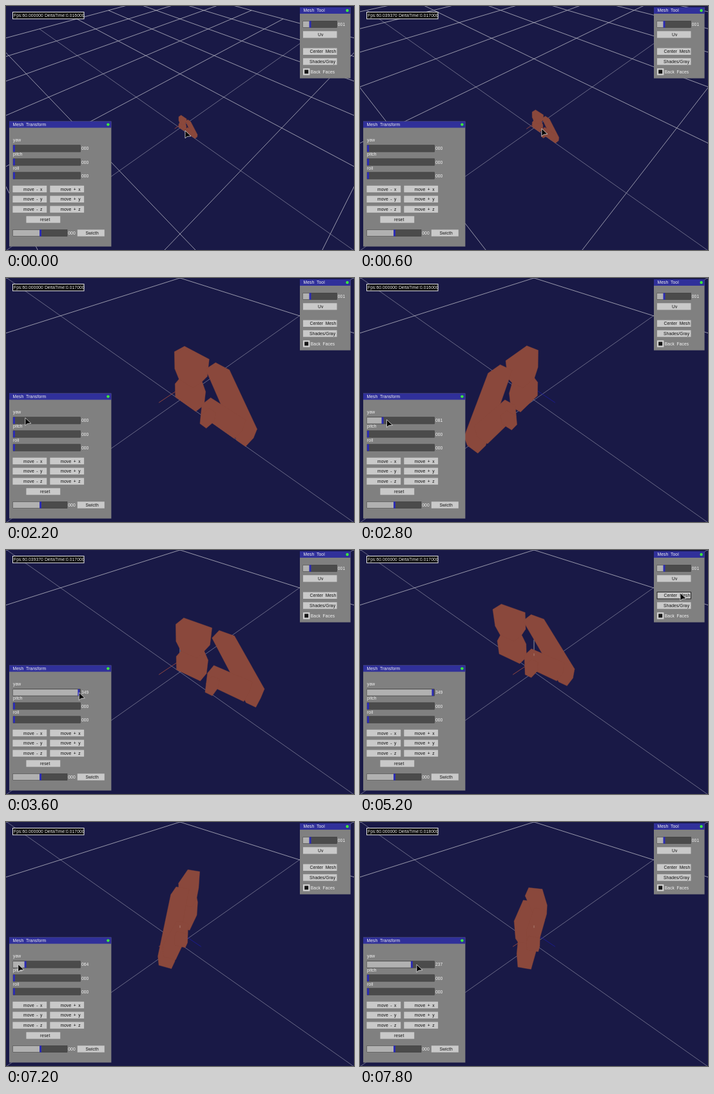
Recreate the animation shown at these times as an HTML page. Size 540 px wide and 380 px high, loop 8 s.

```html
<!DOCTYPE html>
<html lang="en">
<head>
<meta charset="utf-8">
<title>Mesh viewer</title>
<style>
html, body { margin: 0; width: 100%; height: 100%; overflow: hidden; background: #191946; }
svg { display: block; width: 540px; height: 380px; }
text { font: 6.7px "Liberation Sans", Arial, sans-serif; letter-spacing: .1px; white-space: pre; }
</style>
</head>
<body>
<svg id="stage" viewBox="0 0 540 380" xmlns="http://www.w3.org/2000/svg"></svg>
<script>
const LOOP = 8000, STEP = 200;
const CX = 270, CY = 190, FOCAL = 345, C = Math.SQRT1_2, NEAR = 0.02;
const CELL = 1.226, CELLS = 5;      // floor grid
const PIVOT = 0.044, BASE = 0.03;   // depth and height of the mesh origin
const LAG = 60;                     // the slider trails the pointer
const svg = document.getElementById('stage');

function add(tag, attrs) {
  const el = document.createElementNS(svg.namespaceURI, tag);
  set(el, attrs);
  return svg.appendChild(el);
}
function set(el, attrs) { for (const k in attrs) el.setAttribute(k, attrs[k]); }
const rect = (x, y, width, height, fill, more) => add('rect', { x, y, width, height, fill, ...more });
function label(x, y, str, fill = '#f2f2f2', more) {
  const el = add('text', { x, y, fill, ...more });
  el.textContent = str;
  return el;
}

// Stops of the pointer: time, x, y
const STOPS = [
  [0, 278, 194], [1400, 288, 186], [2350, 11.3, 220], [3600, 113.3, 222],
  [4600, 514, 76], [4800, 497, 67], [5200, 497, 67], [5600, 114, 221],
  [6200, 1, 221], [6540, 114.8, 219], [6620, 114.8, 219], [7400, 0, 222], [7820, 88.5, 222]
];
function pointer(t) {
  const i = Math.max(1, STOPS.findIndex(s => s[0] >= t));
  const last = t > STOPS[STOPS.length - 1][0] ? STOPS.length - 1 : i;
  const [t0, x0, y0] = STOPS[last - 1], [t1, x1, y1] = STOPS[last];
  const p = Math.min(1, Math.max(0, (t - t0) / (t1 - t0)));
  const k = p * p * (3 - 2 * p);
  return [x0 + (x1 - x0) * k, y0 + (y1 - y0) * k];
}

// Yaw follows the pointer while the slider is held, and rests in between
function yawAt(t) {
  if (t < 2400) return 0;
  const held = t > 5600 ? t : Math.min(t, 3600);
  const v = (pointer(held - LAG)[0] - 11.3) / 104.6 * 360;
  return Math.round(Math.min(360, Math.max(0, v)));
}

// Figure as convex outlines [along, height], extruded by THICK
const THICK = 0.055, TOP = 0.241, WAIST = TOP / 2;
const box = (a, b, low, high) => [[a, low], [b, low], [b, high], [a, high]];
const lobe = [...box(-.024, .101, 0, .08), [.078, WAIST], [0, WAIST]];
const PARTS = [
  lobe,
  lobe.map(([a, h]) => [a, TOP - h]),
  [[.1305, TOP], [.191, TOP], [.35, .056], [.35, 0], [.31, 0], [.28, .065]],
  box(.13, .3, 0, .065),
  box(.13, .166, -.057, 0)
];

// u: right, v: away, h: up; the camera looks down at 45 degrees
const toCam = (u, v, h, dist) => [u, (v + h) * C, dist + (v - h) * C];
const toScreen = ([x, y, z]) => [CX + FOCAL * x / z, CY - FOCAL * y / z];

function placeLine(el, p, q) {
  if (p[2] < NEAR && q[2] < NEAR) return set(el, { visibility: 'hidden' });
  const clip = (a, b) => {
    if (a[2] >= NEAR) return a;
    const k = (NEAR - a[2]) / (b[2] - a[2]);
    return a.map((v, i) => v + (b[i] - v) * k);
  };
  const [x1, y1] = toScreen(clip(p, q)), [x2, y2] = toScreen(clip(q, p));
  set(el, { x1, y1, x2, y2, visibility: 'visible' });
}

function hull(points) {
  const pts = points.slice().sort((a, b) => a[0] - b[0] || a[1] - b[1]);
  const half = list => {
    const out = [];
    for (const p of list) {
      while (out.length > 1) {
        const [a, b] = out.slice(-2);
        if ((b[0] - a[0]) * (p[1] - a[1]) - (b[1] - a[1]) * (p[0] - a[0]) > 0) break;
        out.pop();
      }
      out.push(p);
    }
    return out.slice(0, -1);
  };
  return half(pts).concat(half(pts.reverse()));
}

// Scene
rect(0, 0, 540, 380, '#191946');
const grid = [];
for (let n = -CELLS; n <= CELLS; n++) for (const side of [-1, 1]) {
  grid.push({ n, side, el: add('line', { stroke: n ? '#b9b9c6' : '#8c8ca2', 'stroke-width': n ? .8 : .7 }) });
}
const axis = (color, dir) => ({ dir, el: add('line', { stroke: color, 'stroke-width': .9 }) });
const axes = [
  axis('#9c4a40', [-.09, -.09, 0]),
  axis('#1a1a96', [.09, -.09, 0]),
  axis('#a9a3a4', [0, 0, .117])
];
const solids = PARTS.map(() => add('polygon', { fill: '#8a483c', stroke: '#8a483c', 'stroke-width': .4 }));
const tick = add('line', { stroke: '#b58d84', 'stroke-width': .8 });

// Interface
function panel(x, y, w, h, title) {
  rect(x, y, w, h, '#808080');
  rect(x, y, w, 10, '#30309a');
  label(x + 5.5, y + 7.2, title, '#f2f2f2', { 'word-spacing': 2 });
  add('circle', { cx: x + w - 5, cy: y + 5, r: 2.2, fill: '#3cf03c' });
}
function button(x, y, w, str, tx) {
  const face = rect(x, y, w, 10.4, '#c9c9c9');
  label(tx, y + 7.7, str, '#111', { 'word-spacing': 1.5 });
  return face;
}
function slider(x, y, w, max, value, shown) {
  rect(x, y, w, 10.4, '#4b4b4b', { stroke: '#3a3a3a', 'stroke-width': .6 });
  const fill = rect(x, y + .4, 0, 9.6, '#b1b1b1');
  const knob = rect(x, y, 3, 10.4, '#2c2cb4');
  const text = label(x + w + 1.3, y + 7.7, '');
  const update = (v, num) => {
    const pos = v / max * w;
    set(fill, { width: pos });
    set(knob, { x: x + Math.max(0, pos - 1) });
    text.textContent = String(num).padStart(3, '0');
  };
  update(value, shown);
  return update;
}

rect(10.5, 9.5, 110.5, 10.5, '#000', { stroke: '#f0f0f0' });
const stats = label(12, 17, '', '#f4f4f4');

panel(5, 179.6, 158.4, 195, 'Mesh Transform');
const [setYaw] = ['yaw', 'pitch', 'roll'].map((name, i) => {
  label(11, 211 + i * 22.2, name);
  return slider(11, 216.7 + i * 21.1, 104.6, 360, 0, 0);
});
['x', 'y', 'z'].forEach((name, i) => {
  const y = 279.8 + i * 15.8;
  button(10.4, y, 52.8, 'move - ' + name, 27);
  button(68.3, y, 52.8, 'move + ' + name, 84.5);
});
button(31.4, 327.3, 52.8, 'reset', 53);
slider(11, 348.3, 84, 2, 1, 0);
button(110.8, 348.3, 42, 'Swicth', 123.5);

panel(456, 2, 78.6, 110.6, 'Mesh Tool');
slider(461, 23.3, 52.5, 5, 1, 1);
button(461, 39.2, 52.5, 'Uv', 484);
const center = button(461, 65.6, 52.5, 'Center Mesh', 471.5);
button(461, 81.3, 52.5, 'Shades/Gray', 471);
rect(461, 97.2, 10.4, 10.4, '#d4d4d4');
rect(463.2, 99.4, 6, 6, '#141414');
label(472.8, 104.8, 'Back Faces', '#f2f2f2', { 'word-spacing': 1.5 });

const mouse = add('path', {
  d: 'M0 0V12L3 9.3L9 8.6Z', fill: '#000', stroke: '#e6e6e6', 'stroke-width': .8, 'stroke-linejoin': 'round'
});

function drawMesh(dist, yaw, centered) {
  const psi = -(45 + yaw) * Math.PI / 180, co = Math.cos(psi), si = Math.sin(psi);
  const [da, db] = centered ? [-.163, -THICK / 2] : [.027, -.033];
  PARTS.forEach((part, i) => {
    const pts = part.flatMap(([along, h]) => [0, THICK].map(depth => {
      const a = along + da, b = depth + db;
      return toScreen(toCam(a * co - b * si, a * si + b * co + PIVOT, h, dist));
    }));
    set(solids[i], { points: hull(pts).map(p => p.map(v => v.toFixed(2))).join(' ') });
  });
}

function draw(time) {
  const i = Math.floor(time / STEP), t = i * STEP;
  const dist = Math.max(1, 3.79 - 2.543 * t / 1400);
  const yaw = yawAt(t), centered = t >= 5200;

  for (const { n, side, el } of grid) {
    const end = k => toCam(side * (k - n) * CELL * C, (k + n) * CELL * C, 0, dist);
    placeLine(el, end(-CELLS), end(CELLS));
  }
  const fromOrigin = (u, v, h) => toCam(u, v + PIVOT, h + BASE, dist);
  for (const { dir, el } of axes) placeLine(el, fromOrigin(0, 0, 0), fromOrigin(...dir));
  drawMesh(dist, yaw, centered);
  placeLine(tick, fromOrigin(0, 0, .028), fromOrigin(0, 0, .042));
  if (!centered) set(tick, { visibility: 'hidden' });

  setYaw(yaw, yaw);
  const fps = i % 14 === 7 ? '59.940060' : i % 15 === 3 ? '60.039370' : '60.000000';
  const delta = i % 14 === 0 ? 16 : i % 20 === 19 ? 18 : 17;
  stats.textContent = `Fps:${fps} DeltaTime:0.0${delta}000`;

  const [mx, my] = pointer(t);
  const over = mx > 461 && mx < 513.5 && my > 65 && my < 76;
  set(center, { stroke: over ? '#222' : 'none' });
  set(mouse, { transform: `translate(${mx} ${my})` });
}

const start = performance.now();
function loop() {
  draw((performance.now() - start) % LOOP);
  requestAnimationFrame(loop);
}
loop();
</script>
</body>
</html>
```
